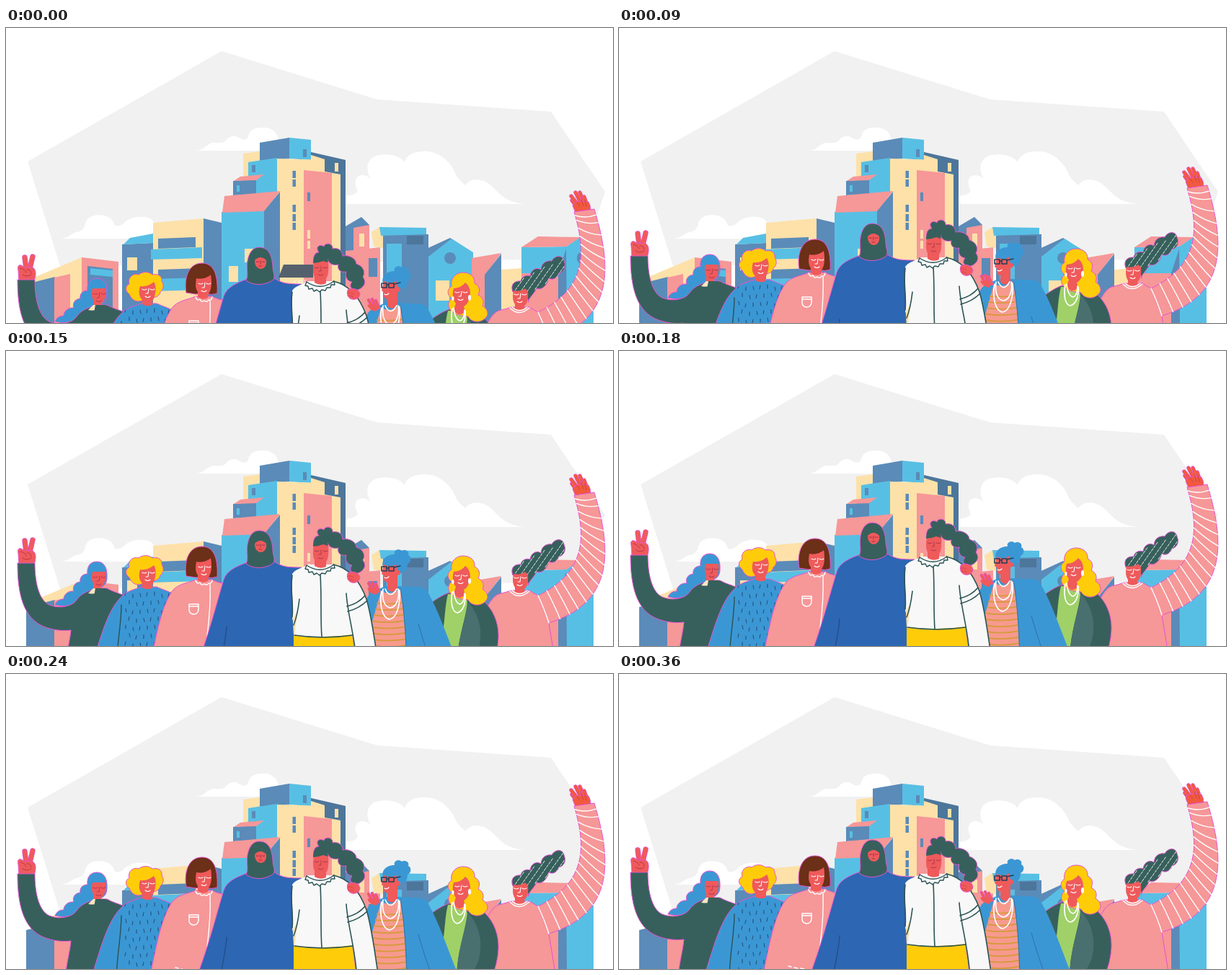
Recreate the animation shown at these times as an HTML page. Size 842 px wide and 409 px high, loop 2.96 s.

```html
<!DOCTYPE html>
<html lang="en">
<head>
<meta charset="utf-8">
<title>Women in front of a city</title>
<style>
  html, body { margin: 0; width: 100%; height: 100%; overflow: hidden; background: #fff; }
  svg { display: block; width: 100vw; height: 100vh; }
  .halo { stroke: #e653d3; stroke-width: 1; }
  .line { fill: none; stroke-linecap: round; stroke-linejoin: round; }
</style>
</head>
<body>
<svg id="stage" viewBox="0 0 842 409">
  <g id="city"></g>
  <g id="people"></g>
</svg>
<script>
const C = {
  sky: '#58bfe4', steel: '#5b8bb8', deep: '#4d769b', rose: '#f69798', sand: '#fde1a9',
  pine: '#37605c', moss: '#4a6f6f', blue: '#3b97d4', royal: '#2d66b3', skin: '#ef5a5b',
  coral: '#f1593f', gold: '#ffcc0a', brown: '#6c2f17', leaf: '#9fd168', paper: '#f8f8f8', ink: '#2b5355'
};
const poly = (fill, pts) => `<polygon fill="${fill}" points="${pts}"/>`;
const shape = (fill, d) => `<path fill="${fill}" d="${d}"/>`;
const halo = (fill, d) => `<path class="halo" fill="${fill}" d="${d}"/>`;
const line = (color, w, d) => `<path class="line" stroke="${color}" stroke-width="${w}" d="${d}"/>`;
const oval = (fill, x, y, rx, ry = rx) => `<ellipse fill="${fill}" cx="${x}" cy="${y}" rx="${rx}" ry="${ry}"/>`;
const box = (fill, x, y, w, h) => `<rect fill="${fill}" x="${x}" y="${y}" width="${w}" height="${h}"/>`;
const finger = (color, w, d) => line('#e653d3', w + 1.4, d) + line(color, w, d);

function face(x, y, color = '#fff') {
  return line(color, 1.1, `M${x - 8} ${y - 3}q3 2 6 0M${x + 3} ${y - 3}q3 2 6 0
    M${x + 1} ${y - 4}l-1 7h-3M${x - 4} ${y + 7}q4 3 7 0`);
}

// Sky and clouds
const sky = [
  poly('#f1f1f1', '30,185 299,32 515,99 756,116 831,227 800,320 75,330'),
  shape('#fff', `M264 170C276 169 277 161 287 159C296 159 300 160 304 157C309 149 319 148 324 153
    C331 156 334 155 336 151C338 140 346 138 357 138C368 138 375 143 378 154V170Z`),
  shape('#fff', `M471 232C480 233 486 230 488 225C482 215 484 205 494 204C500 204 503 207 506 209
    C498 197 500 181 514 177C528 173 546 176 553 186C556 174 569 171 582 171C605 172 618 189 623 201
    C627 210 632 213 637 218C645 207 661 209 670 216C684 227 690 242 720 244H471Z`),
  shape('#fff', `M77 292C89 290 90 285 97 283C104 283 109 278 110 271C113 260 126 258 136 260
    C146 262 149 268 151 274C156 275 160 274 163 271C171 262 183 261 192 262C201 263 205 267 207 273V292Z`)
];

const leftTown = [
  poly(C.sand, '41,345 105,318 105,409 41,409'),
  poly(C.rose, '105,318 156,324 156,409 105,409'),
  poly(C.steel, '113,330 148,334 148,409 113,409'),
  poly(C.sky, '117,333 148,336 148,345 117,342'),
  poly(C.steel, '28,355 68,345 68,409 28,409'),
  poly(C.rose, '67,346 89,341 89,409 67,409'),
  poly(C.steel, '161,300 204,298 204,409 161,409'),
  poly(C.sky, '172,291 204,285 204,298 163,300'),
  box(C.sand, 168, 318, 14, 18),
  poly(C.sand, '204,270 274,264 274,409 204,409'),
  poly(C.steel, '274,264 299,270 299,409 274,409'),
  poly(C.steel, '211,292 263,290 263,304 211,306'),
  poly(C.sky, '201,307 272,304 272,319 201,321'),
  poly(C.steel, '211,335 274,333 274,350 211,350'),
  poly(C.sky, '200,348 272,346 272,363 200,365')
];

const tower = [
  poly(C.sand, '329,174 352,171 376,180 376,206 329,206'),
  poly(C.deep, '423,172 471,183 471,409 423,409'),
  poly(C.sand, '423,176 442,182 442,202 423,202'),
  poly(C.steel, '352,159 393,152 393,181 352,185'),
  poly(C.sky, '393,152 423,155 423,183 393,181'),
  box(C.steel, 412, 168, 5, 11), box(C.sand, 456, 187, 5, 12),
  poly(C.sky, '336,186 376,180 376,230 336,230'),
  box(C.steel, 341, 190, 5, 10),
  poly(C.sand, '376,181 442,183 442,199 464,203 464,409 376,409'),
  poly(C.rose, '413,197 452,201 452,409 413,409'),
  ...[198, 210, 245, 258, 270].map(y => box(C.steel, 397.5, y, 4.5, 10)),
  box(C.steel, 418, 228, 4, 12), box(C.sand, 418, 280, 4, 12), box(C.sand, 418, 295, 4, 11),
  poly(C.steel, '315,212 347,210 347,230 315,232'),
  poly(C.sky, '347,210 358,203 358,230 347,230'),
  box(C.sky, 320, 218, 4, 9),
  poly(C.rose, '325,206 358,203 347,211 316,212'),
  poly(C.sky, '299,255 358,253 358,409 299,409'),
  poly(C.steel, '358,253 380,227 380,409 358,409'),
  poly(C.rose, '303,233 380,226 358,254 300,256'),
  box(C.sand, 309, 330, 13, 22), box(C.sand, 331, 306, 12, 19),
  poly('#54616d', '385,328 426,328 426,346 378,346')
];

const rightTown = [
  poly(C.steel, '471,275 493,262 504,273 504,310 471,310'),
  poly(C.rose, '482,277 504,273 504,310 482,310'),
  box(C.sand, 490, 285, 7, 18),
  poly(C.rose, '471,309 519,304 519,409 471,409'),
  box(C.steel, 503, 319, 12, 26),
  poly(C.sand, '507,283 518,276 523,288 523,305 510,303'),
  poly(C.steel, '523,286 586,286 586,409 523,409'),
  box(C.sky, 528, 299, 21, 50), box(C.deep, 556, 288, 23, 12),
  poly(C.sky, '518,276 583,277 583,286 520,288'),
  poly(C.steel, '579,308 616,291 646,311 646,409 579,409'),
  poly(C.sky, '586,317 618,292 648,311 648,409 586,409'),
  oval(C.steel, 616, 319, 8), box(C.sand, 596, 350, 19, 28),
  poly(C.rose, '646,319 687,312 664,343 646,345'),
  poly(C.rose, '646,343 664,342 664,409 646,409'),
  poly(C.steel, '664,342 687,313 687,409 664,409'),
  poly(C.sand, '687,335 716,333 716,409 687,409'),
  poly(C.sky, '715,304 777,303 777,345 715,345'),
  poly(C.rose, '715,340 768,340 768,409 715,409'),
  poly(C.steel, '766,340 778,303 778,409 766,409'),
  poly(C.sky, '777,303 797,289 815,310 815,409 778,409'),
  poly(C.rose, '715,304 738,289 797,290 777,303'),
  oval(C.steel, 798, 319, 6, 8)
];

const cafe = '<text x="400" y="355" font-size="7" font-family="Lato, sans-serif" fill="#fff">CAFE</text>';

function peaceGirl() {
  return finger(C.skin, 6, 'M26 244L28 260') + finger(C.skin, 6, 'M37 243L33 260') +
    halo(C.skin, 'M17 262C15 254 20 253 24 257L37 258C42 261 42 268 39 277H18Z') +
    line('#b93a4b', 1, 'M20 259q6 1 8 6M29 261q5 -1 6 5M23 268q6 4 12 0') +
    halo(C.pine, `M16 275H40C40 300 45 326 60 333C76 339 91 335 98 325C104 316 112 311 122 310
      H140C149 315 157 317 165 320V420H82C84 398 89 382 90 368C73 370 58 366 48 361C20 346 16 307 16 275Z`) +
    halo(C.blue, `M140 295C141 280 135 273 126 273C116 273 112 281 113 290C106 290 102 295 103 301
      C95 302 92 308 94 314C86 313 80 319 80 325C74 325 70 328 68 333C80 336 92 335 98 326
      C105 316 116 313 125 311C134 309 140 305 140 295Z`) +
    shape(C.skin, 'M120 287H138C139 298 137 306 131 308L134 312H121V303C118 298 119 292 120 287Z') +
    shape('#fce6c2', 'M114 317L121 310H136L138 314Q126 319 114 317Z') +
    shape(C.pine, 'M124 310H138L141 321H122Z') +
    face(129, 297, '#b73c55');
}

function dotsGirl() {
  const body = 'M188 308H209C218 312 226 314 234 319V420H118C131 380 141 337 163 319C170 313 180 311 188 308Z';
  let dots = '';
  for (let row = 0; row < 9; row++)
    for (let i = 0; i < 7; i++)
      dots += `M${166 + i * 10 + (row % 2) * 5} ${315 + row * 11.5 + (i * 7 % 4)}l${(i + row) % 3 - 1} 5`;
  return halo(C.blue, body) +
    `<clipPath id="dress"><path d="${body}"/></clipPath><g clip-path="url(#dress)">${line('#28547e', 1.2, dots)}</g>` +
    line(C.ink, 1.4, 'M160 333C160 360 154 386 153 420') +
    halo(C.gold, `M171 295C164 290 166 283 171 281C168 272 177 265 184 268C190 263 199 264 203 268
      C212 266 217 271 216 277C220 283 218 289 214 292C213 299 204 301 200 299L190 303
      C182 308 174 303 171 295Z`) +
    shape(C.skin, 'M186 284C194 285 200 282 205 278C209 283 208 294 205 301L203 305V310Q196 313 189 309V303C184 298 184 291 186 284Z') +
    face(197, 291);
}

function bobGirl() {
  return halo(C.rose, `M263 298H286C293 302 302 304 314 305V420H199C207 384 215 331 233 311
      C242 303 255 302 263 298Z`) +
    halo(C.brown, 'M250 293C247 277 251 252 272 252C291 252 294 274 293 294Q285 297 278 294L263 295Z') +
    shape(C.skin, 'M264 273C273 275 281 271 284 268C286 279 285 290 281 294L280 300Q273 304 266 299V292C262 286 263 280 264 273Z') +
    face(275, 283) +
    line('#fff', 1.4, 'M263 299q2 6 6 3q2 5 6 2q4 3 6 -1q4 1 5 -4M283 304C284 328 282 352 279 376') +
    line('#fff', 1.5, 'M254 332H267V340Q266 346 260 346Q254 345 254 340ZM254 335H267') +
    line('#fff', 1.4, 'M235 405l4 1m4 1l5 1m4 0l5 1');
}

function hijabGirl() {
  return halo(C.royal, `M335 274C318 280 306 286 302 298C291 335 282 372 264 420H410V281
      C394 281 382 281 371 272Z`) +
    line('#254d86', 1.3, 'M306 363C305 382 300 400 297 420') +
    halo(C.pine, `M351 230C366 230 369 244 370 256C370 265 374 269 371 275C360 283 344 284 333 276
      C337 268 333 260 335 249C337 238 342 230 351 230Z`) +
    shape(C.skin, 'M345 248Q353 240 361 248C362 256 358 260 353 260C347 259 345 254 345 248Z') +
    line('#9f354a', 1, 'M347 250q2 1 4 0M355 250q2 1 4 0M353 249v4M351 256h4');
}

function blouseGirl() {
  return halo(C.pine, `M427 251C425 241 430 237 434 237C428 229 436 225 441 229C442 223 454 224 453 232
      C461 230 467 235 467 242C476 240 486 246 486 253C496 256 499 265 495 271C501 279 496 286 488 289
      C479 290 475 284 480 278C472 277 470 269 472 264C464 266 459 260 461 254C453 256 447 252 446 246L446 256Z`) +
    shape(C.gold, 'M399 374H480L486 420H399Z') +
    shape(C.sand, 'M397 340L408 323V375H399Z') +
    shape(C.paper, `M397 290C403 282 412 282 419 277H454C476 282 491 300 500 325C508 352 511 381 517 420
      H488C485 392 479 369 472 340L481 374Q440 380 400 375L405 340L397 354C399 332 395 310 397 290Z`) +
    line(C.ink, 1.6, `M454 277C476 282 491 300 500 325C508 352 511 381 517 420M472 317C474 348 484 375 487 420
      M397 292C394 313 399 330 397 350M407 325C405 342 403 351 399 361M400 375Q440 381 481 375
      M436 291C438 325 436 350 438 377M473 335Q489 331 498 320M474 342Q490 338 501 327`) +
    shape(C.skin, 'M427 249H447C448 261 447 270 444 273V280Q436 284 428 279V271C425 265 426 258 427 249Z') +
    shape(C.pine, 'M426 252C426 242 432 238 438 239C445 240 448 246 446 251L440 249Q433 252 426 252Z') +
    line('#a43c4d', 1, 'M428 258q3 2 6 0M440 258q3 2 6 0M437 257v6h-3M433 268q4 2 7 0') +
    shape(C.paper, 'M417 278Q436 294 455 277L457 282Q438 297 415 283Z') +
    line(C.ink, 1.4, 'M417 278L415 283l4 1 1 4 5 -1 2 4 4 -2 4 3 3 -3 5 1 2 -4 5 0 1 -4 5 0L455 277Q436 291 417 278') +
    halo(C.skin, 'M474 289C480 285 490 288 491 295C490 301 485 303 480 302C475 301 472 296 474 289Z') +
    line('#d9434f', 1, 'M474 293q5 -1 8 2M475 297q4 0 7 2');
}

function cardiganGirl() {
  let stripes = '';
  for (let y = 330; y < 420; y += 8.5) stripes += `M509 ${y}q25 4 52 -2`;
  return shape(C.blue, 'M526 307H546C562 309 577 306 583 312C598 336 611 374 629 420H510L499 329C501 315 516 312 526 307Z') +
    shape('#f79a8e', 'M520 314Q535 321 547 310C552 340 555 380 556 420H515L508 356C513 340 517 325 520 314Z') +
    `<clipPath id="shirt"><path d="M518 314H547C552 340 555 380 556 420H515L508 356Z"/></clipPath>
      <g clip-path="url(#shirt)">${line('#d79a3d', 1.8, stripes)}</g>` +
    line('#2f79b0', 1.2, 'M547 310C553 340 555 380 556 420M572 359Q580 388 592 420') +
    shape(C.blue, `M523 280C520 270 528 263 539 263C537 257 545 254 549 258C555 255 560 260 558 264
      C564 267 561 275 557 276C557 285 552 290 545 289L541 280Z`) +
    shape(C.skin, `M524 277Q535 282 541 276L543 285C548 284 549 291 543 292V312Q535 318 529 311V302
      C524 301 523 296 525 293L521 290Z`) +
    line('#263f58', 1.6, 'M521 280h7v6h-7zM531 280h7v6h-7zM528 282h3M538 281L547 279') +
    line('#fff', 1.2, 'M525 295q3 2 6 -1') +
    line('#fff', 1.7, `M523 311C521 328 526 336 533 337C543 336 546 321 544 311
      M521 314C517 337 524 352 532 353C544 351 547 328 546 313M526 311Q533 326 542 311`) +
    finger(C.skin, 3, 'M503 303L509 315M508 302L513 314M513 304L517 314') +
    shape(C.skin, 'M501 310Q509 307 518 313L513 319Q504 317 501 310Z');
}

function jacketGirl() {
  return halo(C.pine, 'M586 333C596 325 606 319 615 316H643C669 326 684 350 683 379Q682 400 673 420H590Z') +
    shape(C.leaf, 'M613 318H638L640 330C638 352 626 380 625 420L606 370C609 352 609 333 613 318Z') +
    shape(C.moss, 'M641 329C656 346 662 368 656 393Q651 409 640 420H625C625 383 638 354 641 329Z') +
    halo(C.gold, `M615 315C612 309 615 303 618 301C611 295 612 288 618 284C616 273 624 265 634 265
      C645 265 651 272 650 280C657 283 658 290 655 296C663 300 663 307 661 311C669 316 670 324 665 328
      C658 336 645 334 641 326C630 325 620 323 615 315Z`) +
    shape(C.skin, 'M621 287Q632 286 637 279Q644 284 644 294C643 305 639 310 635 312L637 319Q628 328 621 317L624 308C619 301 619 294 621 287Z') +
    face(631, 295) +
    oval('#fff', 643, 300, 2, 4) + oval('#fff', 620, 301, 1.5, 3) +
    line('#fff', 1.7, 'M619 315C616 333 620 343 626 344C634 342 638 331 637 318M621 314Q623 331 630 332Q636 330 636 317');
}

function cubic(p, t) {
  const s = 1 - t, w = [s * s * s, 3 * s * s * t, 3 * s * t * t, t * t * t];
  return [0, 1].map(k => p.reduce((sum, q, i) => sum + q[k] * w[i], 0));
}

function waveGirl() {
  const inner = [[788, 181], [802, 228], [811, 285], [738, 320]];
  const outer = [[816, 177], [840, 255], [845, 330], [753, 358]];
  const arm = `M${inner[0]}C${inner.slice(1).join(' ')}L${outer[3]}C${outer[2]} ${outer[1]} ${outer[0]}Z`;
  let stripes = '';
  for (const t of [.035, .08, .155, .23, .305, .38, .455, .53, .605, .68, .75, .82, .88, .94, 1]) {
    const a = cubic(inner, t), b = cubic(outer, t);
    const bend = 5 - 4 * t;
    stripes += `M${a}Q${(a[0] + b[0]) / 2 + 2 * t} ${(a[1] + b[1]) / 2 + bend} ${b}`;
  }
  const hair = `M703 292C699 281 706 276 714 277C715 270 723 268 727 270C728 261 736 257 742 261
    C743 250 752 248 757 249C762 240 773 241 774 249C778 258 773 265 767 266C765 273 758 276 753 273
    C750 285 741 290 736 287C731 297 724 301 725 306L721 291Z`;
  let flecks = '';
  for (let i = 0; i < 44; i++) {
    const x = 705 + i * 1.6;
    flecks += `M${x} ${288 - i * .75 + (i * 11 % 25) - 9}l2 -3`;
  }
  const fingers = ['M785 165L793 176', 'M784 159L794 172', 'M790 154L798 170', 'M796 154L803 170', 'M802 160L807 174'];
  return fingers.map(d => finger(C.coral, 4, d)).join('') +
    halo(C.coral, 'M786 172Q790 165 800 166L808 167Q811 172 811 178L790 182Z') +
    line('#c94235', .9, 'M792 168L796 173M798 164L801 172M803 165L805 173') +
    halo(C.rose, `M701 313H726L738 320L753 358C756 378 760 398 763 420H660V348
      C668 337 672 323 683 318Q692 316 701 313Z`) +
    halo(C.rose, arm) + shape(C.rose, 'M728 321L738 321L753 357L738 359Z') +
    line('#fff', 1.4, stripes) +
    halo(C.pine, hair) +
    `<clipPath id="hair"><path d="${hair}"/></clipPath><g clip-path="url(#hair)">${line('#e5eee9', 1, flecks)}</g>` +
    shape(C.skin, 'M704 290Q714 292 720 287L724 291C725 302 723 308 719 311V316Q712 320 706 315V309C702 303 703 296 704 290Z') +
    face(713, 298) +
    line('#fff', 1.4, 'M699 314Q711 327 726 314M702 313Q712 322 723 313');
}

document.getElementById('city').innerHTML = [...sky, ...leftTown, ...rightTown, ...tower, cafe].join('');
const people = document.getElementById('people');
people.innerHTML = [peaceGirl, dotsGirl, bobGirl, hijabGirl, waveGirl, jacketGirl, cardiganGirl, blouseGirl]
  .map(draw => `<g>${draw()}</g>`).join('');

// Rise with a small bounce, one held position per 30 ms
const STEP = 30, LOOP = 2960;
const lift = [74, 63, 52, 41, 30, 19, 8, -3, 2, 6, 2, -1, 0];
function tick() {
  const i = Math.min(lift.length - 1, Math.floor(performance.now() % LOOP / STEP));
  people.setAttribute('transform', `translate(0 ${lift[i]})`);
  requestAnimationFrame(tick);
}
tick();
</script>
</body>
</html>
```
